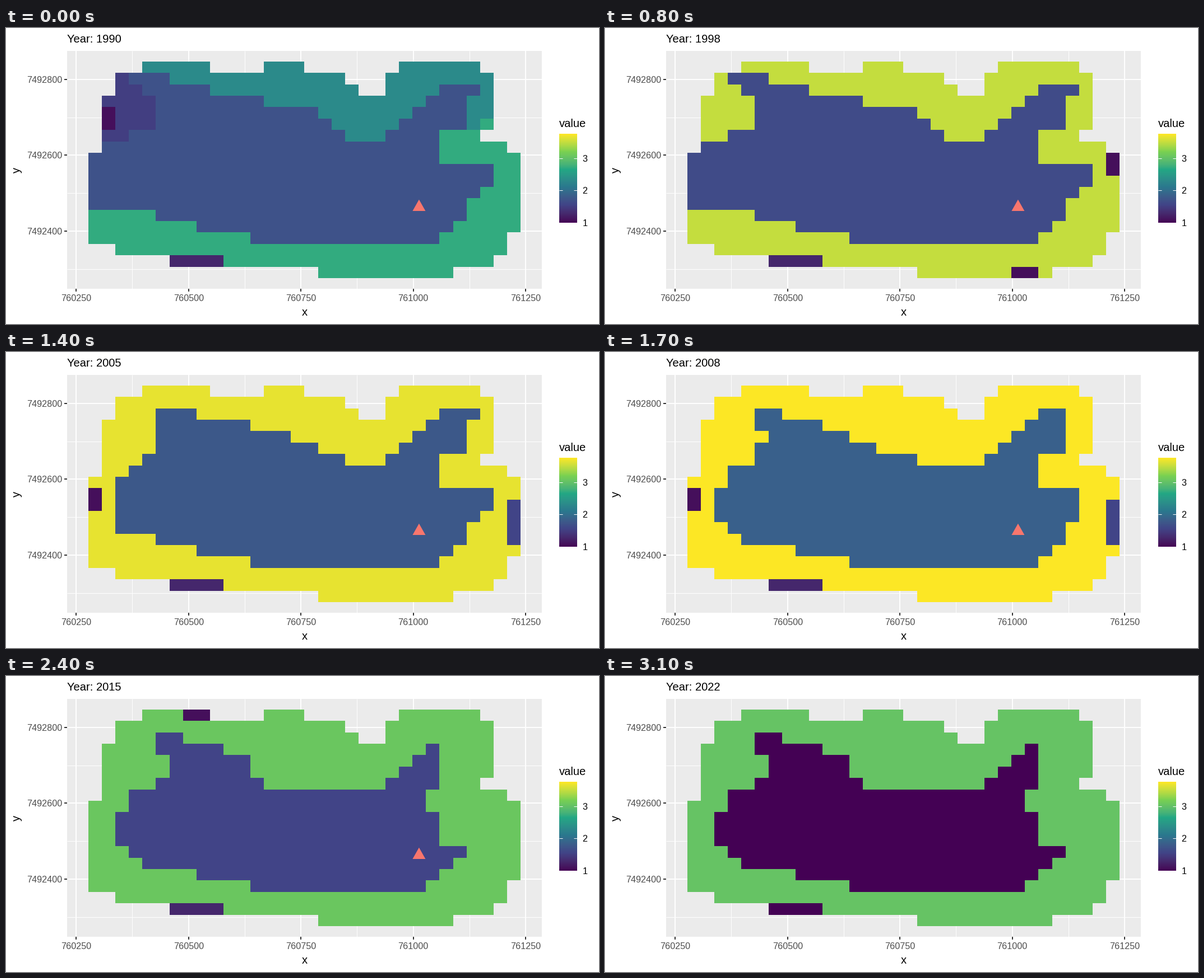
A matplotlib script for the animation above (3.2 s loop, 1058 by 529 pixels).

```python
import numpy as np
import matplotlib.pyplot as plt
from matplotlib.animation import FuncAnimation
from matplotlib.colors import to_rgb
from matplotlib.patches import Polygon, Rectangle
from matplotlib.path import Path

W, H, DPI = 1058, 529, 128
FRAMES, INTERVAL = 32, 100
ROWS, COLS = 19, 32
PANEL = (109.3, 40.8, 956.1, 466.3)  # left, top, right, bottom
MAP = (147, 918, 447, 60)            # left, right, bottom, top
BASE, SMALL = 20.17, 16.13           # text sizes in pixels

plt.rcParams["font.family"] = "Liberation Sans"


# ---- colour scale: six viridis stops blended in Lab space ----
TO_XYZ = np.array([[0.4124564, 0.3575761, 0.1804375],
                   [0.2126729, 0.7151522, 0.0721750],
                   [0.0193339, 0.1191920, 0.9503041]])
WHITE = TO_XYZ.sum(axis=1)
TO_LAB = np.array([[0, 116, 0], [500, -500, 0], [0, 200, -200]])


def rgb_to_lab(rgb):
    lin = np.where(rgb > 0.04045, ((rgb + 0.055) / 1.055) ** 2.4, rgb / 12.92)
    xyz = lin @ TO_XYZ.T / WHITE
    f = np.where(xyz > 0.008856, np.cbrt(xyz), 7.787 * xyz + 16 / 116)
    return f @ TO_LAB.T


def lab_to_rgb(lab):
    f = lab @ np.linalg.inv(TO_LAB).T
    xyz = np.where(f > 0.2069, f ** 3, (f - 16 / 116) / 7.787)
    lin = np.clip((xyz * WHITE) @ np.linalg.inv(TO_XYZ).T, 0, 1)
    return np.where(lin > 0.0031308, 1.055 * lin ** (1 / 2.4) - 0.055, lin * 12.92)


STOPS = ["#440154", "#414487", "#2A788E", "#22A884", "#7AD151", "#FDE725"]
STOP_LAB = rgb_to_lab(np.array([to_rgb(c) for c in STOPS]))


def shade(t):
    """Colour for scale positions 0..1."""
    at = np.linspace(0, 1, len(STOPS))
    return lab_to_rgb(np.stack([np.interp(t, at, c) for c in STOP_LAB.T], -1))


# ---- map: outlines in cell units, sampled at the cell centres ----
row, col = np.indices((ROWS, COLS))
CENTRES = np.column_stack([col.ravel(), row.ravel()]) + 0.5


def inside(outline):
    return Path(outline).contains_points(CENTRES).reshape(ROWS, COLS)


LAND = inside([
    (0, 16), (0, 8.3), (1, 7.5), (1.4, 3.4), (2, 1.1), (4, 0.5), (4, 0), (9, 0),
    (9, 1), (13, 1), (13, 0), (16, 0), (16, 1), (19, 1), (20, 3), (21.8, 3),
    (23, 0), (29, 0), (30, 1.2), (30, 6), (29, 6.4), (29, 7), (31, 7), (32, 8.3),
    (32, 14.8), (31, 15.4), (31, 16.6), (30, 17.5), (27, 18.5), (27, 19),
    (17, 19), (17, 18.5), (6, 17.5), (2, 16.5)])

# Lake outline before and after it shrinks, clockwise from the south-west
LAKE_EARLY = np.array([
    (0, 13), (0, 8), (1.4, 7.4), (5, 5.5), (5, 3), (2.9, 1), (4, 1), (13, 3.5),
    (17, 4.4), (19.2, 7), (21.5, 7), (26.5, 2), (28.7, 2), (28, 5.9), (26, 6),
    (26, 9), (30, 9), (30, 11), (28, 12.5), (28, 13.5), (25.7, 16), (13.3, 16),
    (4.8, 13.4)])
LAKE_LATE = np.array([
    (2.3, 12), (2.3, 9), (3, 7.5), (5, 6.5), (5.9, 4.8), (4.6, 2), (6, 2),
    (11.4, 4.2), (13, 7), (19.2, 7), (21.5, 7), (25.5, 3), (26, 3), (26, 6.8),
    (25, 7), (25, 9), (26, 9), (26, 12), (28, 12), (27, 13.5), (24.8, 16),
    (14.2, 16), (3.8, 13.4)])

# Scale positions over time
KNOTS = [0, 4, 10, 17, 24, 30, 31]
LAKE = [0.255, 0.21, 0.235, 0.31, 0.20, 0.20, 0]
SHORE = [0.62, 0.89, 0.915, 1, 0.75, 0.735, 0.735]
NORTH_START = 0.48
NORTH = row < 9.7 - col / 6

# Dark patches: first frame, end frame, rows, columns, scale position
PATCHES = [
    (0, 32, (17, 18), (6, 10), 0.10),
    (0, 3, (1, 7), (1, 5), 0.18),
    (0, 3, (4, 6), (1, 2), 0.03),
    (3, 6, (1, 7), (1, 5), 0.09),
    (3, 6, (8, 14), (31, 32), 0.18),
    (3, 14, (18, 19), (24, 26), 0.03),
    (6, 14, (8, 10), (31, 32), 0.03),
    (14, 20, (9, 11), (0, 1), 0.03),
    (14, 20, (10, 14), (31, 32), 0.20),
    (20, 27, (0, 1), (7, 9), 0.03),
]


def lake_cells(i):
    """The lake shrinks from west to east, each shore point on its own eased clock."""
    u = np.clip((i - 7 - 0.25 * LAKE_EARLY[:, :1]) / 10, 0, 1)
    u = u * u * (3 - 2 * u)
    return inside(LAKE_EARLY + u * (LAKE_LATE - LAKE_EARLY))


def raster(i):
    """RGBA map for one year."""
    lake_t = np.interp(i, KNOTS, LAKE)
    south_t = np.interp(i, KNOTS, SHORE)
    north_t = np.interp(i, KNOTS, [NORTH_START] + SHORE[1:])
    t = np.where(NORTH, north_t, south_t)
    for first, end, (r0, r1), (c0, c1), value in PATCHES:
        if first <= i < end:
            t[r0:r1, c0:c1] = min(value, lake_t)
    t[lake_cells(i)] = lake_t
    return np.dstack([shade(t), LAND])


# ---- static plot ----
fig = plt.figure(figsize=(W / DPI, H / DPI), dpi=DPI, facecolor="white")
ax = fig.add_axes([0, 0, 1, 1])
ax.set_axis_off()


def pt(px):
    return px * 72 / DPI


def label(x, y, text, size=BASE, color="black", **kw):
    return ax.text(x, y, text, fontsize=pt(size), color=color, va="baseline", **kw)


def line(xs, ys, width, color="white", z=2):
    ax.plot(xs, ys, color=color, lw=pt(width), solid_capstyle="butt", zorder=z)


x0, y0, x1, y1 = PANEL
ax.add_patch(Rectangle((x0, y0), x1 - x0, y1 - y0, fc="#EBEBEB", lw=0, zorder=1))

for n in range(5):
    x = 125.2 + 200.5 * n
    if n < 4:
        line([x + 100.25] * 2, [y0, y1], 0.98)
    line([x, x], [y0, y1], 1.96)
    line([x, x], [y1, y1 + 5], 1.96, "#333333")
    label(x, 488, str(760250 + 250 * n), SMALL, "#4D4D4D", ha="center")

for n in range(3):
    y = 91.6 + 135.75 * n
    line([x0, x1], [y + 67.9] * 2, 0.98)
    line([x0, x1], [y, y], 1.96)
    line([x0 - 5, x0], [y, y], 1.96, "#333333")
    label(100.6, y + 5.9, str(7492800 - 200 * n), SMALL, "#4D4D4D", ha="right")

label(532.7, 514, "x", ha="center")
label(25, 253.5, "y", ha="center", rotation=90, rotation_mode="anchor")

# Colour bar
label(986.5, 177, "value")
ax.imshow(shade(np.linspace(0, 1, 300))[:, None], extent=(987, 1019, 348, 189),
          origin="lower", aspect="auto", interpolation="nearest", zorder=2)
for n in range(3):
    y = 347.6 - 57.2 * n
    line([987, 993.4], [y, y], 0.98, z=3)
    line([1012.6, 1019], [y, y], 0.98, z=3)
    label(1028.5, y + 5.9, str(n + 1), SMALL)

# Moving parts
title = label(109.2, 26, "")
cells = ax.imshow(raster(0), extent=MAP, aspect="auto",
                  interpolation="nearest", zorder=3)
marker = ax.add_patch(Polygon([(736.9, 306.6), (748.4, 327), (725.4, 327)],
                              fc="#F8766D", lw=0, zorder=4))
ax.set_xlim(0, W)
ax.set_ylim(H, 0)


def update(i):
    title.set_text(f"Year: {1990 + i + (i >= 12)}")  # 2002 has no data
    cells.set_data(raster(i))
    marker.set_visible(i < FRAMES - 1)
    return title, cells, marker


anim = FuncAnimation(fig, update, frames=FRAMES, interval=INTERVAL,
                     repeat=True, repeat_delay=0)
plt.show()
```
